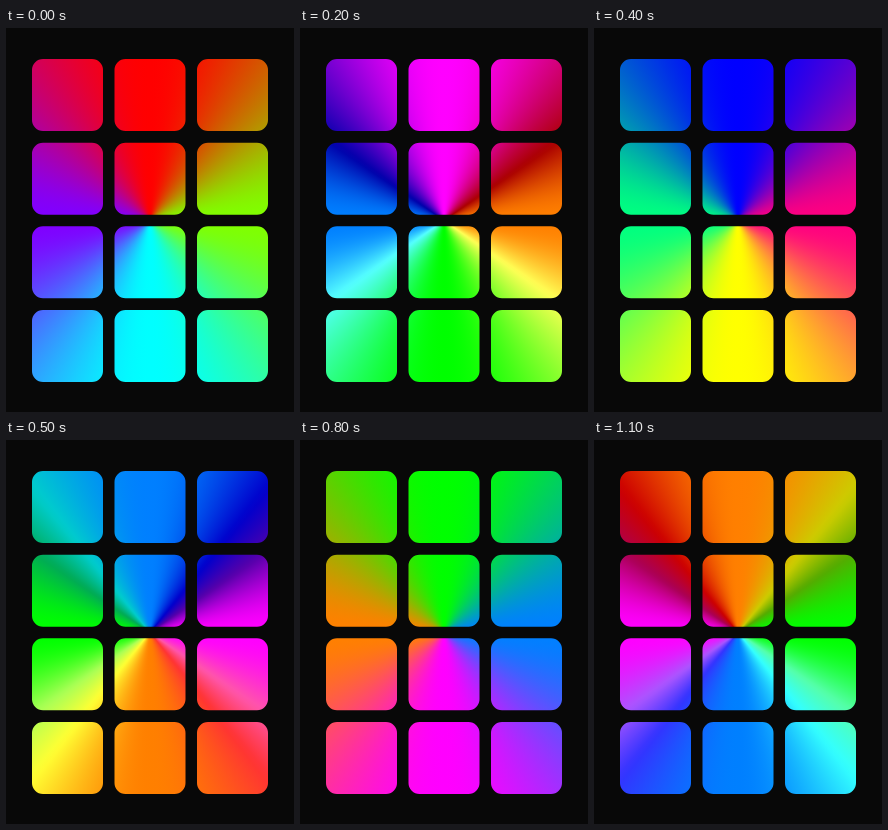
An HTML page with a canvas for the animation above (1200 ms loop, 288 by 384 pixels).

```html
<!DOCTYPE html>
<html lang="en">
<head>
<meta charset="utf-8">
<title>Rainbow tiles</title>
<style>
  html, body { margin: 0; width: 100%; height: 100%; overflow: hidden; background: #080808; }
  canvas { display: block; width: 288px; height: 384px; }
</style>
</head>
<body>
<canvas id="stage"></canvas>
<script>
const LOOP = 1200, STEPS = 12;
const CENTER = { x: 144, y: 192.5 };
const TILE = { x: 26, y: 31, w: 71, h: 72, dx: 82.5, dy: 83.67, r: 11 };
const WHEEL = [[255, 0, 0], [128, 255, 0], [0, 255, 255], [128, 0, 255]];
const STOPS = 180;

const canvas = document.getElementById('stage');
const ctx = canvas.getContext('2d');
const ratio = window.devicePixelRatio || 1;
canvas.width = 288 * ratio;
canvas.height = 384 * ratio;
ctx.scale(ratio, ratio);

const smooth = u => u * u * (3 - 2 * u);

// Colour around the wheel, blended in RGB, returned as hue and lightness.
function wheelColor(turn) {
  const pos = turn * WHEEL.length;
  const i = Math.floor(pos);
  const from = WHEEL[i % WHEEL.length], to = WHEEL[(i + 1) % WHEEL.length];
  const k = smooth(pos - i);
  const [r, g, b] = from.map((c, n) => (c + (to[n] - c) * k) / 255);
  const max = Math.max(r, g, b), min = Math.min(r, g, b), d = max - min;
  const sector = max === r ? (g - b) / d : max === g ? 2 + (b - r) / d : 4 + (r - g) / d;
  return { hue: sector * 60, light: (max + min) * 50 };
}

const wheel = Array.from({ length: STOPS + 1 }, (_, i) => wheelColor(i / STOPS));

const tiles = new Path2D();
for (let row = 0; row < 4; row++) {
  for (let col = 0; col < 3; col++) {
    tiles.roundRect(TILE.x + col * TILE.dx, TILE.y + row * TILE.dy, TILE.w, TILE.h, TILE.r);
  }
}

function draw(time) {
  const step = Math.floor((time % LOOP) / LOOP * STEPS);
  const shift = 360 - step * 360 / STEPS;
  const gradient = ctx.createConicGradient(-Math.PI / 2, CENTER.x, CENTER.y);
  wheel.forEach(({ hue, light }, i) => {
    const h = (hue + shift + 360) % 360;
    gradient.addColorStop(i / STOPS, `hsl(${h.toFixed(2)}, 100%, ${light.toFixed(2)}%)`);
  });
  ctx.fillStyle = '#080808';
  ctx.fillRect(0, 0, 288, 384);
  ctx.fillStyle = gradient;
  ctx.fill(tiles);
}

function tick() {
  draw(performance.now());
  requestAnimationFrame(tick);
}
tick();
</script>
</body>
</html>
```
